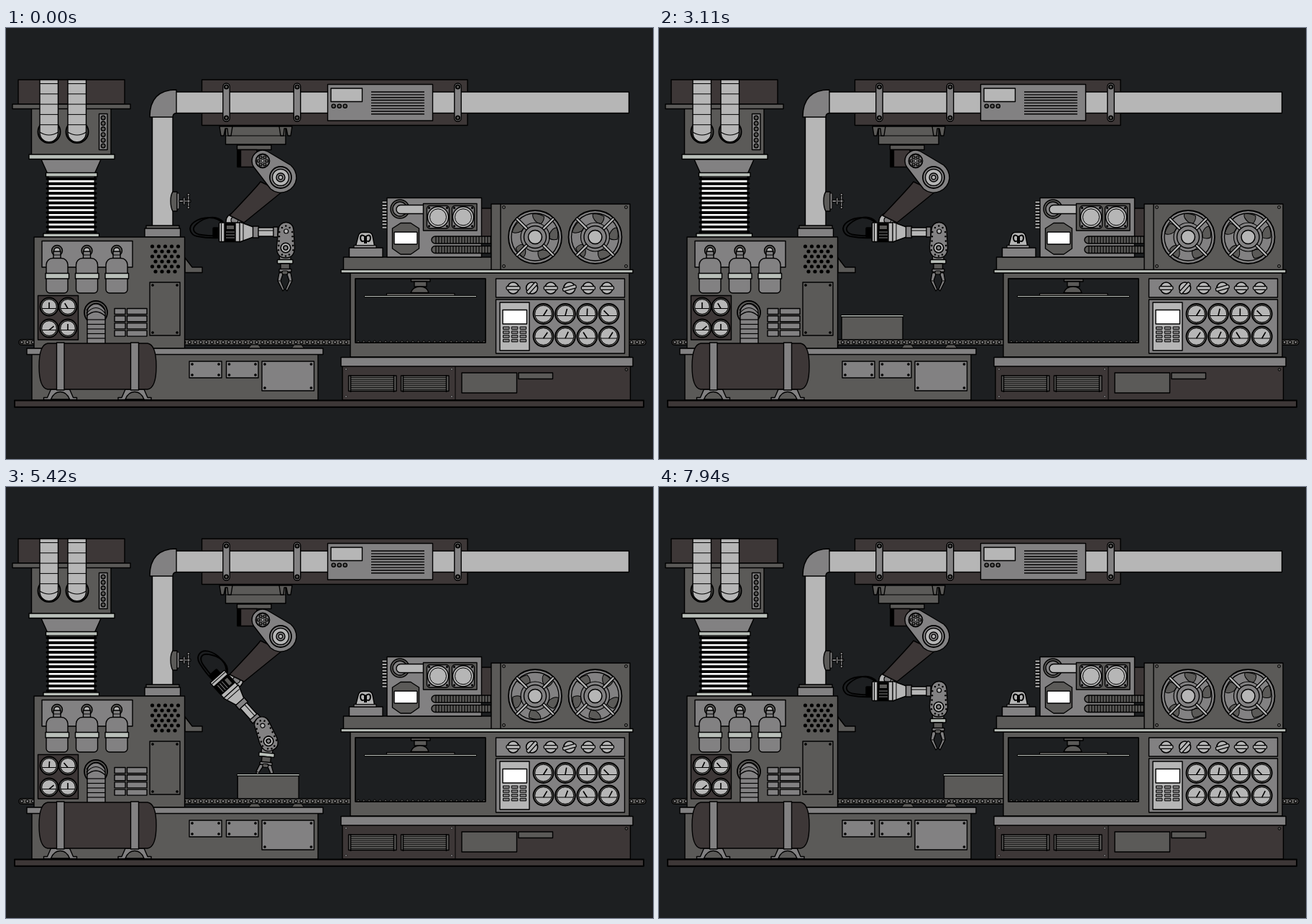
These frames come from a looping animation (900 by 600 pixels, 8 s). An HTML page with a canvas:

```html
<!DOCTYPE html>
<html lang="en">
<head>
<meta charset="utf-8">
<title>Assembly line</title>
<style>
html, body { margin: 0; width: 100%; height: 100%; overflow: hidden; background: #1d1f21; }
canvas { display: block; }
</style>
</head>
<body>
<canvas id="stage" width="900" height="600"></canvas>
<script>
const ctx = document.getElementById('stage').getContext('2d');
const BG = '#1d1f21', BLACK = '#000', BROWN = '#3d3737', DARK = '#5b5a58',
      GREY = '#828182', LIGHT = '#b6b6b6', PALE = '#b9bfb9', WHITE = '#fff';
const LOOP = 8000, RAD = Math.PI / 180;

// ---- drawing helpers ----
function paint(fill, width = 1.4, stroke = BLACK) {
  if (fill) { ctx.fillStyle = fill; ctx.fill(); }
  if (width) { ctx.lineWidth = width; ctx.strokeStyle = stroke; ctx.stroke(); }
}
function box(x1, y1, x2, y2, fill, radius = 0, width = 1.4) {
  ctx.beginPath();
  ctx.roundRect(x1, y1, x2 - x1, y2 - y1, radius);
  paint(fill, width);
}
function disc(x, y, r, fill, width = 1.4) {
  ctx.beginPath();
  ctx.arc(x, y, r, 0, 7);
  paint(fill, width);
}
function shape(d, fill, width = 1.4, stroke = BLACK) {
  const path = new Path2D(d);
  if (fill) { ctx.fillStyle = fill; ctx.fill(path); }
  if (width) { ctx.lineWidth = width; ctx.strokeStyle = stroke; ctx.stroke(path); }
}
function line(x1, y1, x2, y2, width = 1.4, color = BLACK) {
  ctx.beginPath();
  ctx.moveTo(x1, y1);
  ctx.lineTo(x2, y2);
  paint(null, width, color);
}
function repeat(count, draw) { for (let i = 0; i < count; i++) draw(i); }
function turned(x, y, degrees, draw) {
  ctx.save();
  ctx.translate(x, y);
  ctx.rotate(degrees * RAD);
  draw();
  ctx.restore();
}
function turnedAbout(x, y, degrees, draw) {
  turned(x, y, degrees, () => { ctx.translate(-x, -y); draw(); });
}
function bolts(x1, y1, x2, y2, inset = 4, r = 1.6, fill = BLACK) {
  for (const x of [x1 + inset, x2 - inset])
    for (const y of [y1 + inset, y2 - inset]) disc(x, y, r, fill, r < 2 ? 0.5 : 1);
}
function plate(x1, y1, x2, y2, fill) {
  box(x1, y1, x2, y2, fill);
  bolts(x1, y1, x2, y2);
}

// ---- timing ----
function ease(t, from, to) {
  const p = Math.min(1, Math.max(0, (t - from) / (to - from)));
  return (1 - Math.cos(p * Math.PI)) / 2;
}

// ---- overhead rail and pipe ----
function drawRail() {
  box(272.5, 72, 642, 135.5, BROWN);
  box(236, 89, 866.5, 118.5, LIGHT);
  box(203.5, 122, 232, 276, LIGHT);
  shape('M200 124Q200 86 237 86V118.5Q232 119 232 124Z', GREY);
  box(195, 275, 241, 280, DARK);
  box(193, 279, 242.5, 291, GREY);
  for (const x of [306.5, 405, 628.5]) {
    box(x - 4.7, 77, x + 4.7, 130, GREY, 4.5);
    disc(x, 82, 2.6, DARK, 1.8);
    disc(x, 125, 2.6, DARK, 1.8);
  }
  box(447.5, 78.5, 593.5, 129, GREY);
  box(452, 84, 495.5, 102.5, LIGHT);
  repeat(3, i => disc(455.7 + i * 8, 108.7, 2.6, DARK));
  repeat(9, i => line(508, 89 + i * 3.85, 582, 89 + i * 3.85));
  // valve
  shape('M238 228H232Q229 232 229 241Q229 250 232 255H238Z', DARK);
  box(238, 230, 241, 252, GREY, 1, 1);
  box(241, 239.5, 257, 242.5, GREY, 0, 1);
  box(246.5, 236, 249, 246, GREY, 0, 1);
  box(252.5, 232, 255, 250, GREY, 0, 1);
  disc(253.8, 232, 1.8, GREY, 1);
  disc(253.8, 241, 2.2, GREY, 1);
  disc(253.8, 250, 1.8, GREY, 1);
}

// ---- robot arm ----
function drawArmBase() {
  box(305.5, 137, 389, 162, DARK);
  line(305, 150, 389, 150, 1);
  shape('M297 137H315L313 150H309L308 140H305L303 150H299Z', DARK);
  shape('M398 137H380L382 150H386L387 140H390L392 150H396Z', DARK);
  box(321.5, 163, 369, 169.5, DARK);
  box(322, 169.5, 349, 193.5, BROWN);
  box(322, 170, 326.5, 193, BLACK);
}
function drawUpperArm() {
  shape('M354 214Q350 220 311 261L331 271L384 228Z', BROWN);
  shape('M342 185A15 15 0 0 1 364 172L396 191Q404 198 404 209A22 22 0 0 1 368 224L345 194Q342 190 342 185Z', GREY);
  disc(357, 185, 9.5, GREY, 1.8);
  repeat(6, i => disc(357 + 5.8 * Math.cos(i * 60 * RAD), 185 + 5.8 * Math.sin(i * 60 * RAD), 2, DARK, 1.2));
  disc(357, 185, 2, LIGHT, 1);
  disc(382, 208, 15, GREY, 1.8);
  disc(382, 208, 11.5, LIGHT);
  disc(382, 208, 6, GREY);
  disc(382, 208, 2.8, LIGHT, 1.2);
}
function drawGripper(open) {
  box(380.5, 317, 396, 323, GREY, 1);
  box(377.5, 322.5, 399, 328, PALE, 1);
  box(382, 328, 394.5, 336, DARK);
  box(380, 335.5, 397, 339.5, GREY, 1);
  for (const side of [-1, 1]) {
    ctx.save();
    ctx.translate(388, 340);
    ctx.scale(side, 1);
    ctx.rotate(-open * 14 * RAD);
    shape('M3 0L8 1L10 12L3 26L1 24L6 12L3 3Z', GREY, 1.3);
    line(7, 12, 10, 12, 1);
    ctx.restore();
  }
  box(384, 338, 392, 343, DARK, 2, 1.2);
}
function drawHand() {
  shape('M379 281A10.5 10.5 0 0 1 400 281L401.5 304Q402 320 389 320Q376 320 376.5 304Z', GREY);
  repeat(5, i => {
    disc(380.3 - i * 0.35, 284 + i * 6.3, 1.3, BLACK, 0);
    disc(398.2 + i * 0.35, 284 + i * 6.3, 1.3, BLACK, 0);
  });
  repeat(3, i => disc(384 + i * 5.3, i === 1 ? 275.5 : 278, 1.3, BLACK, 0));
  repeat(3, i => disc(384 + i * 5, i === 1 ? 317.5 : 315.5, 1.3, BLACK, 0));
  disc(389.7, 283, 3, LIGHT, 1.2);
  disc(389, 306, 6.8, LIGHT, 1.6);
  disc(389, 306, 3, GREY, 1.6);
}
function drawForearm() {
  shape('M302 273C294 260 272 263 262 270S256 288 266 290S284 293 299 292', null, 2);
  shape('M302 270C292 259 276 264 266 272S262 287 272 288S288 290 299 289', null, 2);
  shape('M306 273V269A11 11 0 0 1 328 269V273Z', LIGHT);
  disc(318, 267.5, 5, GREY, 1.2);
  box(288, 278, 297, 291, BLACK, 1);
  box(296.5, 271, 327, 297.5, LIGHT, 1);
  box(304, 272, 319, 297, BLACK);
  box(307, 275, 317, 280, DARK, 0, 0);
  repeat(3, i => line(306, 284 + i * 4, 318, 284 + i * 4, 1, GREY));
  line(299.5, 272, 299.5, 297, 1);
  shape('M325 270L344 277V291L325 298Z', LIGHT);
  line(330, 273, 330, 296, 1);
  box(343.5, 276, 351.5, 292, GREY);
  box(351, 278, 377, 290, LIGHT);
  line(351, 282, 376, 282, 1);
  box(372, 277, 378, 291, GREY);
}
function drawArm(t) {
  const reach = ease(t, 3100, 4130) * (1 - ease(t, 4950, 6450));
  const bend = 62 * reach, hand = -29 * reach, grip = 9 * reach * reach;
  turnedAbout(318, 271, bend, () => {
    drawForearm();
    turnedAbout(389.5, 283, hand - bend, () => {
      turnedAbout(389, 306, grip - hand, () => drawGripper(reach));
      drawHand();
    });
  });
  drawUpperArm();
}

// ---- conveyor ----
function drawCrate(t) {
  const x = 161.3 + t * 0.0295;
  box(x + 1, 402, x + 86, 434, DARK);
  box(x, 399.5, x + 87, 402, PALE, 0, 1);
}
function drawChain() {
  box(18, 433.7, 890, 441.3, DARK, 4);
  repeat(112, i => disc(22 + i * 7.78, 437.5, 2, GREY, 1.2));
}

// ---- left machine ----
function gauge(x, y, r, angle, face) {
  disc(x, y, r, DARK, 1.8);
  disc(x, y, r - 2.2, face, 1);
  line(x - r + 3, y + 2.5, x + r - 3, y + 2.5, 1);
  turned(x, y + 2.5, angle, () => line(0, 0, 0, -r + 4, 1.6));
}
function drawHopper() {
  box(17, 72, 165, 106, BROWN);
  box(35.5, 112, 146, 176.5, DARK);
  box(9, 106, 173, 112.5, DARK);
  for (const x of [60, 99]) {
    disc(x, 144.5, 15.5, DARK, 2);
    shape(`M${x - 13} 72H${x + 12.5}V146A12.7 12.7 0 0 1 ${x - 13} 146Z`, LIGHT);
    repeat(5, i => line(x - 13, 77.5 + i * 14.3, x + 12.5, 77.5 + i * 14.3, 1));
    shape(`M${x - 13} 145Q${x} 153 ${x + 12.5} 145`, null, 1.2);
  }
  box(129.5, 119.5, 141, 169.5, GREY);
  repeat(6, i => disc(135.2, 125 + i * 7.8, 2.8, DARK));
  shape('M49 183H132L123.5 202H57.5Z', GREY);
  box(32, 176, 151, 182.5, PALE);
  box(59, 206, 123, 287, WHITE, 0, 1);
  repeat(12, i => box(56, 208.5 + i * 6.7, 126, 211.5 + i * 6.7, BLACK, 1.5, 1));
  box(55.5, 201.5, 127, 207, PALE);
  box(52, 286, 129.5, 291, PALE);
}
function bottle(x) {
  disc(x, 310, 7.5, DARK);
  disc(x, 310, 4.2, LIGHT);
  box(x - 5, 311, x + 5, 321, GREY);
  line(x - 5, 316, x + 5, 316, 1);
  box(x - 15, 320.5, x + 15, 369, GREY, [9, 9, 5, 5]);
  box(x - 16, 341.5, x + 16.5, 349, PALE);
}
function drawCabinet(t) {
  shape('M249 320L259 333H273V340.5H249Z', DARK);
  box(39, 291, 248.5, 446, DARK);
  box(50, 296.5, 176, 333, GREY);
  [71, 112.5, 154].forEach(bottle);
  repeat(6, row => repeat(row % 2 ? 4 : 5, col =>
    disc(203.5 + (row % 2) * 4.5 + col * 9, 304 + row * 7, 2.6, BLACK, 0)));
  plate(200, 354, 242, 428, DARK);
  repeat(4, i => {
    box(151, 390.5 + i * 10.2, 166, 398.5 + i * 10.2, GREY);
    box(168.5, 390.5 + i * 10.2, 196, 398.5 + i * 10.2, GREY);
  });
  box(44.5, 372.5, 100.5, 434, BROWN);
  const swing = ease(t, 5100, 6500);
  gauge(60, 388, 12.5, 25 * swing, LIGHT);
  gauge(86, 388, 12.5, -30 - 10 * ease(t, 4300, 5400), LIGHT);
  gauge(60, 418, 12.5, 50, LIGHT);
  gauge(86, 418, 12.5, 0, LIGHT);
  disc(125, 396, 16, DARK, 1.8);
  shape('M113 441V396A12.5 12.5 0 0 1 138 396V441Z', GREY);
  repeat(3, i => shape(`M112 ${393 + i * 4}Q125 ${375 + i * 7} 138 ${393 + i * 4}`, null, 1.2));
  repeat(5, i => line(113, 406 + i * 6.5, 138, 406 + i * 6.5, 1.2));
}
function drawTable() {
  for (const x of [346, 406]) shape(`M${x - 9} 446L${x - 5} 441H${x + 5}L${x + 9} 446Z`, DARK, 1);
  box(36, 454, 434, 518, DARK);
  box(29, 446, 441, 454.5, GREY);
  plate(255, 464, 300, 487, GREY);
  plate(306.5, 464, 351, 487, GREY);
  plate(356, 464, 428.5, 505, GREY);
  for (const x of [75.5, 179]) {
    shape(`M${x - 23} 517.5V514.5H${x - 18}L${x - 13} 503H${x + 13}L${x + 18} 514.5H${x + 23}V517.5Z`, GREY);
    shape(`M${x - 13} 517Q${x - 9} 506.5 ${x} 506.5T${x + 13} 517Z`, DARK);
  }
  shape('M58 439H197Q209 441 209 471Q209 501 197 503H58Q46 501 46 471Q46 441 58 439Z', BROWN);
  box(70.5, 438, 81, 504, GREY);
  box(173.5, 438, 184.5, 504, GREY);
}

// ---- right machine ----
function drawFan(x, spin) {
  disc(x, 291, 37, GREY, 1.8);
  disc(x, 291, 33, GREY, 1.3);
  turned(x, 291, spin, () => repeat(5, () => {
    ctx.rotate(72 * RAD);
    shape('M20 -4Q24 -13 30 -13Q33 -4 31 3Q25 5 20 2Z', DARK, 1);
  }));
  disc(x, 291, 20, null, 1.2);
  turned(x, 291, 45, () => repeat(4, () => {
    ctx.rotate(90 * RAD);
    box(12, -1.8, 37, 1.8, LIGHT, 0, 1.2);
  }));
  disc(x, 291, 15.5, GREY, 1.4);
  disc(x, 291, 9.5, LIGHT, 1.5);
}
function drawTopUnits(t) {
  box(661, 251, 676, 291, BROWN);
  box(469.5, 319, 688, 337, DARK);
  box(477.5, 306, 524, 319, GREY);
  shape('M486 305.5L490 290Q491 284.5 496 284.5H504Q509 284.5 510 290L513 305.5Z', LIGHT);
  shape('M484 302.5H515V306H484Z', GREY, 1.2);
  shape('M499 300V290Q493 286 493 293Q494 299 499 296M501 300V290Q507 286 507 293Q506 299 501 296', null, 2);
  repeat(9, i => box(523, 241 + i * 4.4, 532, 244 + i * 4.4, LIGHT, 1, 1));
  box(530, 236.5, 661.5, 319, GREY);
  disc(548, 252, 13, DARK);
  disc(548, 252, 10, GREY);
  shape('M583 246.5H549A6 6 0 0 0 549 258.5H583Z', LIGHT);
  box(580.5, 244.5, 655, 282, DARK);
  for (const x of [601, 636]) {
    box(x - 15.5, 247.5, x + 15.5, 279, GREY, 4);
    bolts(x - 15.5, 247.5, x + 15.5, 279, 3, 1.4);
    disc(x, 263.3, 14.5, LIGHT);
    disc(x, 263.3, 11.5, LIGHT, 1);
  }
  shape('M546 273.5L549 271.5H563L566 273.5L574.5 279V307L566 313L563 315H549L546 313L537.5 307V279Z', DARK);
  box(540, 284, 572, 301, WHITE, 1);
  for (const y of [290, 303.5]) {
    box(592, y, 676, y + 10, DARK, [5, 0, 0, 5]);
    repeat(20, i => line(598 + i * 4, y, 598 + i * 4, y + 10, 1.2));
  }
  box(675, 245, 868, 337, DARK);
  line(688, 245, 688, 336);
  bolts(688, 245, 867, 336, 4.5, 2, DARK);
  drawFan(736, t * 0.045);
  drawFan(819.5, t * 0.045);
}
function drawKnob(x, angle) {
  disc(x, 362, 8, LIGHT, 1.6);
  turned(x, 362, angle, () => box(-9.5, -2.3, 9.5, 2.3, LIGHT, 1.5, 1.3));
}
function drawPress() {
  // frame around the open chamber
  shape('M479 341H867V458H479ZM486 349V438H667V349Z', DARK);
  box(486, 349, 667, 438, BG);
  repeat(24, i => disc(490 + i * 7.6, 436.5, 1.5, DARK, 1));
  box(563.5, 349.5, 590, 353, DARK);
  box(568, 353, 585, 360, DARK);
  shape('M563 368.5Q566 360 576 360T588 368.5Z', DARK);
  box(529.5, 369.5, 624, 373, DARK, 0, 1.2);
  box(498.5, 372.5, 654.5, 374.7, PALE, 0, 1);
  box(466, 336.5, 872, 341, PALE);
}
function drawControls(t) {
  box(681.5, 349, 860.5, 375, GREY);
  [0, -48, 0, -15, 0, 0].forEach((angle, i) => drawKnob(705.5 + i * 26.1, angle));
  box(681.5, 378, 860.5, 453, GREY);
  box(687, 382, 728, 449, LIGHT);
  box(691, 392.5, 724.5, 412, WHITE);
  repeat(4, row => repeat(3, col =>
    box(691.5 + col * 11.8, 416 + row * 5.8, 700 + col * 11.8, 419.5 + row * 5.8, GREY, 0, 1)));
  const drift = 5 * ease(t, 1000, 6500);
  [32, 15, 2, -45, 35, 25, -32, 32].forEach((angle, i) =>
    gauge(747.5 + (i % 4) * 30.4, i < 4 ? 398 : 429.5, 14, angle - (i % 3 ? drift : 0), LIGHT));
}
function drawBase() {
  box(468, 470, 868.5, 518, BROWN);
  line(625, 471, 625, 518, 1);
  bolts(468, 470, 625, 518, 5, 1.5, GREY);
  disc(863, 475.5, 1.8, DARK, 1);
  for (const x of [476.5, 549.5]) {
    box(x, 484, x + 66.5, 505.5, DARK);
    repeat(7, i => line(x + 3, 486.5 + i * 2.8, x + 63, 486.5 + i * 2.8, 0.8));
    line(x + 3, 483, x + 3, 507, 1.5);
    line(x + 63, 483, x + 63, 507, 1.5);
  }
  box(634, 480, 710.5, 508, DARK);
  box(713, 480, 760.5, 488.5, DARK);
  box(466, 458.5, 872, 471, GREY);
  box(12, 518.5, 887, 527.8, BROWN, 0, 2);
}

function draw(t) {
  ctx.fillStyle = BG;
  ctx.fillRect(0, 0, 900, 600);
  ctx.lineJoin = 'round';
  drawRail();
  drawArmBase();
  drawArm(t);
  drawCrate(t);
  drawChain();
  drawHopper();
  drawCabinet(t);
  drawTable();
  drawTopUnits(t);
  drawPress();
  drawControls(t);
  drawBase();
}
function tick() {
  draw(performance.now() % LOOP);
  requestAnimationFrame(tick);
}
tick();
</script>
</body>
</html>
```
